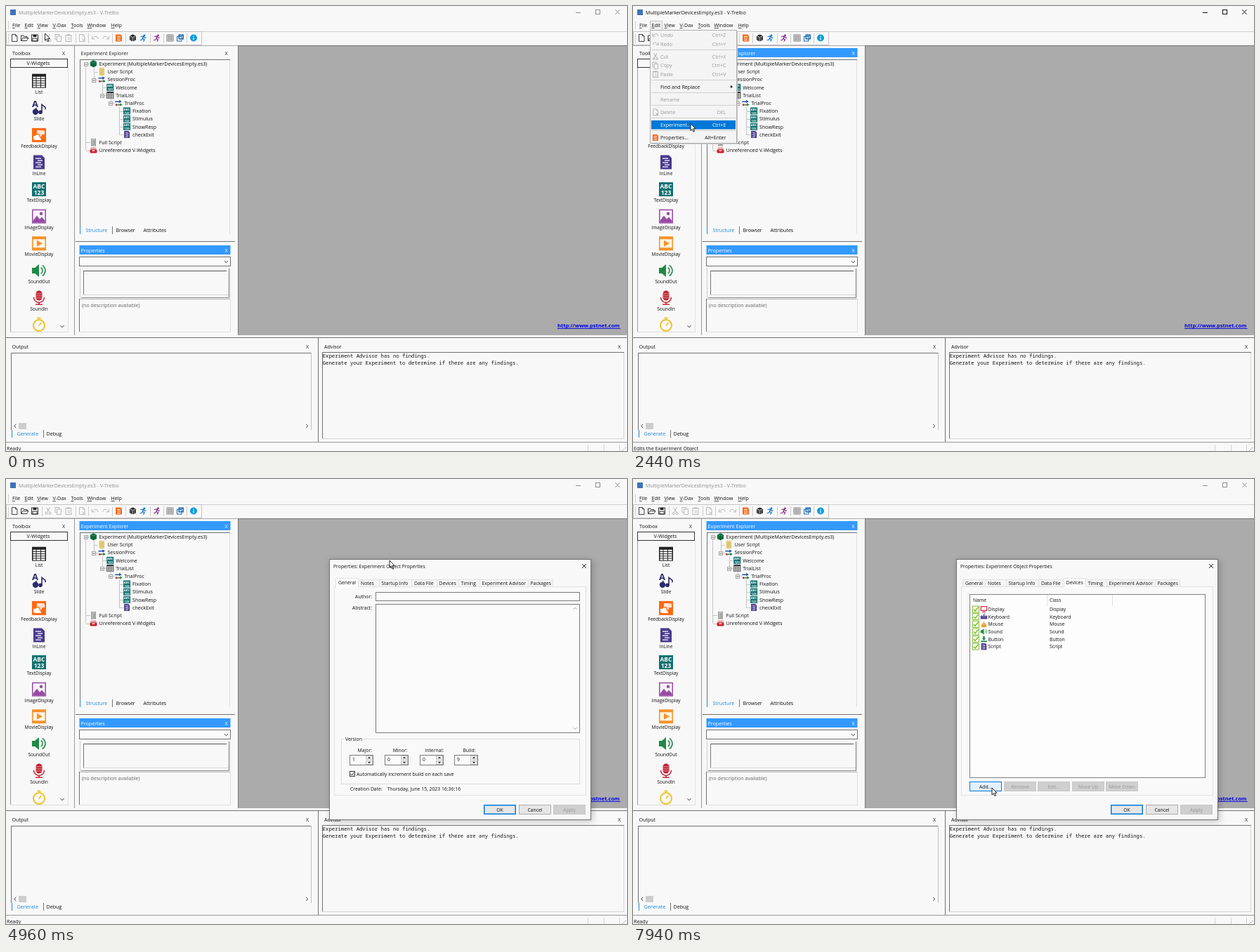
Write an HTML page with a canvas that moves like this. It is 884 px wide and 634 px high and loops after 8 s.

```html
<!DOCTYPE html>
<html lang="en">
<head>
<meta charset="utf-8">
<title>Experiment editor</title>
<style>
html, body { margin: 0; width: 100%; height: 100%; overflow: hidden; background: #f8f8f8; }
canvas { display: block; width: 884px; height: 634px; }
</style>
</head>
<body>
<canvas id="stage"></canvas>
<script>
const LOOP = 8000, W = 884, H = 634;
const BG = '#f8f8f8', BLUE = '#3399ff', LINK = '#1e88dd', DARK = '#707070', SOFT = '#d4d4d4', DIM = '#9a9a9a';
const SANS = '"Open Sans", "Noto Sans", sans-serif';
const cv = document.getElementById('stage'), g = cv.getContext('2d');
const dpr = window.devicePixelRatio || 1;
cv.width = W * dpr;
cv.height = H * dpr;

// ---- drawing helpers ----
function text(s, x, y, color = '#111', size = 7.1, align = 'left', font = SANS, weight = '') {
  g.font = `${weight} ${size}px ${font}`;
  g.textAlign = align;
  g.fillStyle = color;
  g.fillText(s, x, y);
}
function fill(x, y, w, h, c) { g.fillStyle = c; g.fillRect(x, y, w, h); }
function box(x, y, w, h, c, bg) {
  if (bg) fill(x, y, w, h, bg);
  g.strokeStyle = c;
  g.lineWidth = 1;
  g.strokeRect(x + .5, y + .5, w - 1, h - 1);
}
function hl(x, y, w, c = DARK) { fill(x, y, w, 1, c); }
function vl(x, y, h, c = DARK) { fill(x, y, 1, h, c); }
function path(pts, close) {
  g.beginPath();
  for (let i = 0; i < pts.length; i += 2) g.lineTo(pts[i], pts[i + 1]);
  if (close) g.closePath();
}
function line(pts, c = '#222', w = 1) { path(pts); g.strokeStyle = c; g.lineWidth = w; g.stroke(); }
function poly(pts, c) { path(pts, true); g.fillStyle = c; g.fill(); }
function disc(x, y, r, c) { g.beginPath(); g.arc(x, y, r, 0, 7); g.fillStyle = c; g.fill(); }
function arc(x, y, r, a, b, c, w) { g.beginPath(); g.arc(x, y, r, a, b); g.strokeStyle = c; g.lineWidth = w; g.stroke(); }
function cross(x, y, r, c, w = 1) {
  line([x - r, y - r, x + r, y + r], c, w);
  line([x - r, y + r, x + r, y - r], c, w);
}
function chevron(x, y, dx, dy, c = '#333') {
  line(dx ? [x - dx, y - 2.5, x + dx, y, x - dx, y + 2.5] : [x - 2.5, y - dy, x, y + dy, x + 2.5, y - dy], c, 1);
}
function mnemonic(s, x, y) {
  text(s, x, y);
  fill(x, y + 1, g.measureText(s[0]).width, .7, '#111');
}

// ---- icons, drawn on a 20 unit grid around the centre ----
const icons = {
  list() {
    fill(-10, -10, 20, 20, '#222');
    for (let r = 0; r < 5; r++) for (let c = 0; c < 3; c++)
      fill(c ? -10 + c * 6.5 : -8.5, -6 + r * 3.2, c ? 5.5 : 4, 2.2, '#fff');
  },
  slide() {
    text('A', -10, -1, '#2b2a6c', 13, 'left', SANS, 'bold');
    disc(-5, 5.5, 4.2, '#2b2a6c');
    line([-5, 2, -3.5, 0], '#2b2a6c', 1.5);
    line([4, 6, 4, -5, 9, -1, 9, 2], '#2b2a6c', 1.6);
    disc(2, 6, 2.8, '#2b2a6c');
  },
  feedback() {
    fill(-10, -10, 20, 20, '#ff6a13');
    for (const k of [1, -1]) {
      g.save();
      g.scale(k, k);
      poly([-8, 1, -5, 1, -2, -4, 0, -4, 0, 0, 3, 0, 3, 7, -5, 7, -8, 6], k > 0 ? '#fff' : '#ffe3d0');
      g.restore();
    }
    line([-9, -1, 0, -1, 5, 9], '#ff6a13', 1.2);
  },
  script() {
    poly([-8, -10, 4, -10, 8, -6, 8, 10, -8, 10], '#4a3a8c');
    for (let i = 0; i < 5; i++) fill(i % 2 ? -2 : -5, -6 + i * 3, i % 2 ? 7 : 8, 1.4, '#e8e4f6');
  },
  abc() {
    fill(-10, -10, 20, 20, '#0f7070');
    text('ABC', 0, -1, '#fff', 8.5, 'center', SANS, 'bold');
    text('123', 0, 8, '#fff', 8.5, 'center', SANS, 'bold');
  },
  image() {
    fill(-10, -10, 20, 20, '#964ba3');
    fill(-8.5, -8.5, 17, 17, '#f8f2fa');
    poly([-8.5, 6, -3, -1, 1, 4, 4, 1, 8.5, 6, 8.5, 8.5, -8.5, 8.5], '#964ba3');
    disc(3, -4, 2.2, '#964ba3');
  },
  movie() {
    fill(-10, -10, 20, 20, '#f5922a');
    fill(-8.5, -6, 17, 12, '#fff4e4');
    poly([-3, -4.5, 5, 0, -3, 4.5], '#f5922a');
  },
  sound() {
    poly([-10, -4, -6, -4, 0, -9, 0, 9, -6, 4, -10, 4], '#1f8a45');
    arc(0, 0, 5, -1, 1, '#1f8a45', 1.6);
    arc(0, 0, 9, -1, 1, '#1f8a45', 1.6);
  },
  mic() {
    g.beginPath();
    g.roundRect(-4.5, -10, 9, 14, 4.5);
    g.fillStyle = '#c4202f';
    g.fill();
    for (let i = 0; i < 3; i++) fill(-4.5, -6 + i * 3, 9, .8, '#eeb0b5');
    arc(0, -.5, 7.5, 0, Math.PI, '#c4202f', 1.5);
    fill(-.8, 7, 1.6, 3, '#c4202f');
    fill(-5, 9, 10, 1.4, '#c4202f');
  },
  clock() {
    arc(0, 1, 8, 0, 7, '#efc326', 2);
    fill(-2.5, -10.5, 5, 2, '#efc326');
    line([0, 1, 3.5, -3], '#efc326', 1.6);
  },
  cube() {
    poly([0, -10, 9, -6, 9, 6, 0, 10, -9, 6, -9, -6], '#0c6a3c');
    line([-9, -6, 0, -2, 9, -6], '#5fae86', 1.2);
    line([0, -2, 0, 10], '#07502b', 1.5);
  },
  page() {
    box(-7, -10, 14, 20, '#c4a646', '#f1d988');
    for (let i = 0; i < 4; i++) fill(-4, -6 + i * 4, 8, 1.4, '#bd9c3a');
  },
  grayPage() {
    box(-7, -10, 14, 20, '#666', '#d9d9d9');
    for (let i = 0; i < 4; i++) fill(-4, -6 + i * 4, 9, 1.6, '#5b6b62');
  },
  proc() {
    fill(-10, -5.5, 13, 3, '#1f4fa0');
    poly([2, -9, 9, -4, 2, 0], '#1f4fa0');
    fill(-3, 3.5, 8, 3, '#1f8a45');
    poly([4, 0, 11, 5, 4, 9], '#1f8a45');
    disc(-6, 5, 3, '#d02a35');
  },
  tray() {
    poly([-7, -8, 7, -8, 10, 0, -10, 0], '#e8a0a0');
    g.beginPath();
    g.roundRect(-10, -2, 20, 10, 3);
    g.fillStyle = '#c8202c';
    g.fill();
    fill(-4, 0, 8, 2.5, '#fff');
  },
  screen() {
    g.strokeStyle = '#d4213d';
    g.lineWidth = 2.5;
    g.strokeRect(-9, -8, 18, 12);
    fill(-5, 7, 10, 2.5, '#d4213d');
  },
  keys() { fill(-10, -3, 20, 10, '#4a3a8c'); line([0, -3, 0, -8, 4, -8], '#4a3a8c', 2); fill(-7, 0, 14, 1.2, '#cfc8ea'); },
  mouse() { disc(0, 3, 7, '#f0a030'); fill(-7, 2, 14, 7, '#f0a030'); line([0, -4, 0, -9], '#f0a030', 2); fill(-.7, -2, 1.4, 5, '#fff'); },
  press() { poly([-2.5, -9, 2.5, -9, 2.5, -2, 6, -2, 0, 4, -6, -2, -2.5, -2], '#1f8a45'); fill(-9, 5, 18, 4, '#1f8a45'); },
  check() {
    g.strokeStyle = '#7fbf33';
    g.lineWidth = 2;
    g.strokeRect(-9, -9, 18, 18);
    line([-6, 0, -2, 5, 7, -6], '#7fbf33', 3);
  },
  runner() {
    disc(4, -7, 2.8, ink);
    line([-7, -4, 1, -5, 5, 0, 9, -1], ink, 2.4);
    line([1, -4, -1, 2, 4, 5, 1, 10], ink, 2.8);
    line([-1, 2, -4, 6, -9, 6], ink, 2.4);
  },
  props() { poly([-9, -10, 5, -10, 9, -6, 9, 10, -9, 10], '#f36a1d'); for (let i = 0; i < 3; i++) fill(-5, -5 + i * 5, 10, 1.8, '#fff'); },
  sheet() { path([-7, -10, 3, -10, 8, -5, 8, 10, -7, 10], true); g.strokeStyle = ink; g.lineWidth = 1.7; g.stroke(); line([3, -10, 3, -5, 8, -5], ink, 1.5); },
  folder() { line([-10, 8, -10, -7, -4, -7, -2, -4, 7, -4, 7, 0], ink, 1.8); line([-10, 8, -5, 0, 11, 0, 6, 8, -10, 8], ink, 1.8); },
  disk() { g.strokeStyle = ink; g.lineWidth = 1.8; g.strokeRect(-9, -9, 18, 18); fill(-5, -9, 10, 6, ink); g.strokeRect(-6, 1, 12, 8); },
  cut() { line([-5, -10, 4, 4], ink, 2); line([5, -10, -4, 4], ink, 2); arc(-5, 7, 3, 0, 7, ink, 2); arc(5, 7, 3, 0, 7, ink, 2); },
  copy() { g.strokeStyle = ink; g.lineWidth = 1.8; g.strokeRect(-9, -10, 11, 14); fill(-4, -5, 12, 15, BG); g.strokeRect(-4, -5, 12, 15); },
  paste() { g.strokeStyle = ink; g.lineWidth = 1.8; g.strokeRect(-8, -8, 16, 18); fill(-4, -10, 8, 4, ink); fill(-3, -1, 8, 1.5, ink); fill(-3, 4, 8, 1.5, ink); },
  erase() { icons.sheet(); cross(5, 6, 4, ink, 2); },
  undo() { line([-9, -5, -9, 3, -1, 3], ink, 1.8); line([-9, 3, -2, -4, 5, -4, 9, 3], ink, 1.8); },
  redo() { g.scale(-1, 1); icons.undo(); },
  crate() {
    poly([0, -10, 9, -6, 9, 6, 0, 10, -9, 6, -9, -6], '#222');
    line([-9, -6, 0, -2, 9, -6], '#fff', 1.4);
    line([0, -2, 0, 10], '#fff', 1.4);
    line([-5, -4, -5, 8], '#fff', 1);
    line([5, -4, 5, 8], '#fff', 1);
  },
  grid() { fill(-10, -10, 20, 20, '#8a8a8a'); for (let i = 0; i < 9; i++) fill(-8 + i % 3 * 6, -8 + (i / 3 | 0) * 6, 4, 4, '#e4e4e4'); },
  panes() { fill(-5, -10, 15, 14, '#1769b5'); fill(-2, -6, 9, 7, BG); g.strokeStyle = '#1769b5'; g.lineWidth = 2; g.strokeRect(-9, -4, 13, 13); },
  info() { disc(0, 0, 10, '#0a9be0'); fill(-1.2, -6, 2.4, 2.6, '#fff'); fill(-1.2, -1.5, 2.4, 7.5, '#fff'); }
};
let ink = '#222';
function icon(name, x, y, size, color = '#222') {
  ink = color;
  g.save();
  g.translate(x, y);
  g.scale(size / 20, size / 20);
  icons[name]();
  g.restore();
}

// ---- main window ----
const menus = [['File', 9], ['Edit', 26.5], ['View', 44.5], ['V-Dax', 66.5], ['Tools', 92.5], ['Window', 115.5], ['Help', 149.5]];
const tools = [['sheet', 12], ['folder', 26.5], ['disk', 41], ['cut', 60, 1], ['copy', 74.5, 1], ['paste', 89, 1], ['erase', 108, 1],
  ['undo', 127, 1], ['redo', 142, 1], ['props', 160.5], ['crate', 180.5], ['runner', 195, '#0d78c8'], ['runner', 214.5, '#8a2c8c'],
  ['grid', 233.5], ['panes', 248], ['info', 267]];
const toolbox = [['List', 'list'], ['Slide', 'slide'], ['FeedbackDisplay', 'feedback'], ['InLine', 'script'], ['TextDisplay', 'abc'],
  ['ImageDisplay', 'image'], ['MovieDisplay', 'movie'], ['SoundOut', 'sound'], ['SoundIn', 'mic'], ['', 'clock']];
const tree = [['Experiment (MultipleMarkerDevicesEmpty.es3)', 0, 'cube'], ['User Script', 1, 'page'], ['SessionProc', 1, 'proc'],
  ['Welcome', 2, 'abc'], ['TrialList', 2, 'list'], ['TrialProc', 3, 'proc'], ['Fixation', 4, 'abc'], ['Stimulus', 4, 'abc'],
  ['ShowResp', 4, 'abc'], ['checkExit', 4, 'script'], ['Full Script', 0, 'grayPage'], ['Unreferenced V-Widgets', 0, 'tray']];

function header(s, y, active) {
  if (active) fill(104.5, y - 7, 215, 13, BLUE);
  const c = active ? '#fff' : '#222';
  text(s, 106.5, y + 2.7, c);
  text('X', 313.5, y + 2.5, c, 7.1, 'center');
}

function titleBar(active) {
  const c = active ? '#111' : '#8e8e8e';
  fill(6, 5, 8, 8, '#3f72b8');
  text('MultipleMarkerDevicesEmpty.es3 - V-Trelbo', 18, 12, c);
  hl(811, 9, 7, c);
  box(839, 5, 7, 7, c);
  cross(870.5, 8.5, 3.2, c);
}

function toolBar() {
  for (const [s, x] of menus) mnemonic(s, x, 30);
  hl(0, 36, W, '#cfcfcf');
  box(0, 36, 279, 20, '#c4c4c4');
  for (let y = 22; y < 53; y += 2) if (y < 34 || y > 39) fill(3, y, 1, 1, '#aaa');
  for (const x of [51, 99, 117, 151, 170, 205, 224, 257]) vl(x, 39, 14, '#cdcdcd');
  for (const [n, x, c] of tools) icon(n, x, 45.5, 10, c === 1 ? '#b4b4b4' : c);
}

function toolboxPanel() {
  text('Toolbox', 9, 70);
  text('X', 82, 69.5, '#222', 7.1, 'center');
  vl(6, 87, 377, '#999');
  vl(88, 87, 377, '#e2e2e2');
  hl(6, 464, 83, '#dcdcdc');
  box(6, 75, 82, 13, '#333', BG);
  text('V-Widgets', 46, 84, '#111', 7.1, 'center');
  toolbox.forEach(([s, n], i) => {
    const y = 106.7 + i * 38.6;
    icon(n, 47, y, 20);
    text(s, 47, y + 18, '#111', 6.6, 'center');
  });
  chevron(80, 456.5, 0, 1.3);
  vl(97, 56, 413, '#999');
}

function explorer(active) {
  header('Experiment Explorer', 67, active);
  hl(105, 76, 214, DARK);
  vl(105, 76, 249, DARK);
  vl(318, 77, 248, '#dedede');
  const row = i => 82.3 + i * 11.2, dots = '#c4c4c4';
  const trunk = (l, a, b) => vl(Math.round(113 + l * 11.9), row(a), row(b) - row(a), dots);
  trunk(0, 0, 11); trunk(1, .5, 2); trunk(2, 2.5, 4); trunk(3, 4.5, 5); trunk(4, 5.5, 9);
  tree.forEach(([s, l, n], i) => {
    const x = 113.5 + l * 11.9, y = row(i);
    hl(Math.round(x), Math.round(y), 6, dots);
    if ([0, 2, 4, 5].includes(i)) {
      const bx = Math.round(x) - 3, by = Math.round(y) - 2;
      box(bx, by, 6, 6, '#a4a4a4', '#fff');
      fill(bx + 1.5, by + 2.5, 3, 1, '#444');
    }
    icon(n, x + 11, y, 10);
    text(s, x + 19, y + 2.6);
  });
  vl(105, 314, 11, LINK);
  text('Structure', 113.5, 322, LINK);
  vl(151, 314, 11, '#777');
  text('Browser', 156.5, 322);
  text('Attributes', 195.5, 322);
  hl(99, 335, 227, DARK);
}

function properties() {
  header('Properties', 348, true);
  box(104, 357, 216, 14, DARK, '#fbfbfb');
  chevron(313.5, 364.5, 0, 1.2);
  vl(105, 373, 43, '#ccc');
  vl(319, 373, 43, '#e4e4e4');
  hl(110, 377, 204, '#555');
  vl(110, 377, 35, '#777');
  hl(107, 415, 211, '#888');
  hl(110, 411, 207, '#d8d8d8');
  vl(317, 374, 41, '#777');
  hl(105, 417, 215, '#b0b0b0');
  vl(104, 417, 47, DARK);
  vl(319, 417, 47, '#dedede');
  hl(105, 464, 215, '#dedede');
  text('(no description available)', 108, 428.5, '#666');
}

function workspace() {
  hl(0, 56, W, '#a8a8a8');
  fill(330, 56, W - 330, 413, '#ababab');
  vl(330, 56, 413, '#777');
  hl(330, 56, W - 330, '#777');
  text('http://www.pstnet.com', 785, 457.5, '#0000ee', 7.55, 'left', SANS, 'bold');
  fill(785, 459, 89.5, .9, '#0000ee');
}

function bottom(status) {
  hl(0, 472, W, DARK);
  text('Output', 8.5, 488);
  text('X', 429, 487.5, '#222', 7.1, 'center');
  hl(7, 494, 428, DARK);
  vl(7, 494, 110, DARK);
  vl(434, 494, 110, '#c0c0c0');
  chevron(13, 598.5, -1.3, 0);
  fill(18, 594, 11, 9, '#cdcdcd');
  chevron(428.5, 598.5, 1.3, 0);
  vl(8, 604, 11, LINK);
  text('Generate', 15.5, 611.7, LINK);
  vl(53, 604, 11, '#777');
  text('Debug', 57.5, 611.7);
  vl(444, 473, 148, DARK);
  text('Advisor', 453, 488);
  text('X', 873, 487.5, '#222', 7.1, 'center');
  hl(450, 493, 430, DARK);
  vl(450, 493, 123, DARK);
  hl(450, 616, 430, SOFT);
  vl(879, 494, 122, SOFT);
  const mono = '"Noto Sans Mono", "DejaVu Sans Mono", monospace';
  text('Experiment Advisor has no findings.', 450.7, 501, '#111', 7.28, 'left', mono);
  text('Generate your Experiment to determine if there are any findings.', 450.7, 510.7, '#111', 7.28, 'left', mono);
  hl(0, 621, W, '#999');
  for (const x of [828, 851, 873]) vl(x, 625, 9, SOFT);
  for (let i = 0; i < 3; i++) fill(881 - i * 2, 629 + i * 2, 1.2, 1.2, '#999');
  text(status, 1, 633);
}

// ---- Edit menu: label, centre y, shortcut, enabled, icon ----
const items = [['Undo', 41.5, 'Ctrl+Z', 0, 'undo'], ['Redo', 54, 'Ctrl+Y', 0, 'redo'], ['Cut', 72, 'Ctrl+X', 0, 'cut'],
  ['Copy', 84.7, 'Ctrl+C', 0, 'copy'], ['Paste', 97.2, 'Ctrl+V', 0, 'paste'], ['Find and Replace', 115, '', 1],
  ['Rename', 133, '', 0], ['Delete', 151.3, 'DEL', 0, 'erase'], ['Experiment...', 169.3, 'Ctrl+E', 1],
  ['Properties...', 187.5, 'Alt+Enter', 1, 'props']];
const lit = '#0078d7';

function menuItem([s, y, key, on, ic], hot) {
  if (hot) fill(26, y - 6.3, 120, 12.6, lit);
  const c = hot ? '#fff' : on ? '#111' : DIM;
  text(s, 39, y + 2.6, c);
  text(key, 132.3, y + 2.6, c, 7, 'right');
  if (ic) icon(ic, 32, y, 9, '#a8a8a8');
  if (s[0] === 'F') poly([139, y - 2.3, 142, y, 139, y + 2.3], c);
}

function editMenu(alpha, hot) {
  g.save();
  g.globalAlpha = alpha;
  fill(24, 34, 124, 162, '#f4f4f4');
  box(24, 34, 124, 162, '#b0b0b0');
  hl(26, 196, 123, '#c8c8c8');
  vl(148, 36, 160, '#c8c8c8');
  for (const y of [62, 105, 123, 141, 159, 177]) hl(26, y, 120, '#cfcfcf');
  for (const it of items) menuItem(it, it[0] === hot);
  g.restore();
}

// ---- dialog ----
const DS = 6.85;
const label = (s, x, y, align) => text(s, x, y, '#111', DS, align);
const tabs = [['General', 473, 469, 501], ['Notes', 505, 501, 531], ['Startup Info', 534.5, 531, 577], ['Data File', 581, 577, 613],
  ['Devices', 616.5, 613, 644], ['Timing', 647.5, 644, 674], ['Experiment Advisor', 677.5, 674, 743], ['Packages', 746.5, 743, 778]];

function button(s, x, y, state) {
  const off = state === 'off', hot = state === 'hot', main = state === 'main';
  box(x, y, 46, 14, main || hot ? lit : off ? '#c8c8c8' : '#adadad', off ? '#cfcfcf' : hot ? '#e2f0fb' : '#e6e6e6');
  if (main) box(x + 1, y + 1, 44, 12, '#6fb2e8');
  text(s, x + 23, y + 9.6, off ? '#979797' : '#111', DS, 'center');
}

function generalPage() {
  label('Author:', 521, 170, 'right');
  box(526, 161, 291, 13, '#7a7a7a', '#fbfbfb');
  label('Abstract:', 521, 186.3, 'right');
  box(526, 178, 291, 184, '#7a7a7a', '#fbfbfb');
  chevron(810, 184.5, 0, -1.2, '#aaa');
  chevron(810, 355.5, 0, 1.2, '#aaa');
  box(477, 370, 340, 65, '#dcdcdc');
  fill(481, 368, 27, 5, BG);
  label('Version', 483, 372.7);
  [['Major:', 1, 489, 521], ['Minor:', 0, 539, 571.5], ['Internal:', 0, 589, 623], ['Build:', 9, 638, 668.5]].forEach(([s, n, x, r]) => {
    label(s, r, 388.7, 'right');
    box(x, 393, 34, 15, '#7a7a7a', '#fbfbfb');
    label(String(n), x + 4, 402.3);
    for (const k of [0, 1]) {
      const y = 394 + k * 7;
      box(x + 23, y, 10, 6, '#c4c4c4', '#eee');
      const d = k ? 1 : -1;
      poly([x + 26, y + 3 - d, x + 30, y + 3 - d, x + 28, y + 3 + d * 1.3], '#222');
    }
  });
  box(489, 416, 8, 8, '#333', '#fff');
  line([490.5, 420, 492.3, 422, 495.5, 418], '#222', 1);
  label('Automatically increment build on each save', 499, 422.8);
  label('Creation Date:', 490, 444);
  label('Thursday, June 15, 2023 16:36:16', 542.5, 444);
}

function devicesPage(hot) {
  box(479, 164, 336, 262, '#828282', '#fdfdfd');
  label('Name', 484, 175.3);
  label('Class', 593, 175.3);
  vl(589, 165, 16, '#e0e0e0');
  vl(682, 165, 16, '#e0e0e0');
  [['Display', 'screen'], ['Keyboard', 'keys'], ['Mouse', 'mouse'], ['Sound', 'sound'], ['Button', 'press'], ['Script', 'script']].forEach(([s, n], i) => {
    const y = 185.5 + i * 10.64;
    icon('check', 488, y, 10);
    icon(n, 499.5, y, 9.5);
    label(s, 505.5, y + 2.5);
    label(s, 593, y + 2.5);
  });
  ['Add...', 'Remove', 'Edit...', 'Move Up', 'Move Down'].forEach((s, i) =>
    button(s, Math.floor(479.5 + i * 48.6), 431, i ? 'off' : hot ? 'hot' : 'main'));
}

function dialog(devices, hot) {
  g.save();
  g.shadowColor = 'rgba(0,0,0,.22)';
  g.shadowBlur = 9;
  g.shadowOffsetX = 2;
  g.shadowOffsetY = 2;
  fill(460, 114, 373, 372, BG);
  g.restore();
  box(460, 114, 373, 372, '#707070');
  label('Properties: Experiment Object Properties', 466, 127);
  cross(823, 124, 3, '#222');
  box(467, 153, 359, 298, '#e2e2e2', '#f9f9f9');
  tabs.forEach(([s, x, a, b], i) => {
    const on = i === (devices ? 4 : 0), y = on ? 141 : 143;
    box(a, y, b - a + 1, 154 - y, '#e0e0e0', on ? '#fdfdfd' : '#f5f5f5');
    if (on) fill(a + 1, 152, b - a - 1, 3, '#fdfdfd');
    label(s, x, on ? 149.7 : 150.7);
  });
  devices ? devicesPage(hot) : generalPage();
  button('OK', 680, 464, 'main');
  button('Cancel', 730, 464);
  button('Apply', 779, 464, 'off');
}

// ---- pointer: time, x, y ----
const moves = [[0, 55.5, 39], [140, 46, 32], [260, 41, 28.5], [400, 38, 28], [520, 36, 27.3], [1500, 41, 34], [1650, 52, 70],
  [1770, 62, 110], [1920, 72, 145], [2050, 79, 166.5], [2440, 82, 167.5], [4250, 100, 161], [4380, 123, 153], [4530, 262, 136],
  [4680, 390, 123], [4810, 485, 116], [4960, 546, 116], [5110, 592, 130], [5250, 618, 137], [5380, 635, 145], [5510, 624, 146.5],
  [6540, 624, 164], [6690, 618, 200], [6830, 603, 232], [6970, 593, 258], [7090, 586, 276], [7410, 562, 287], [7560, 524, 371],
  [7700, 515, 414], [7820, 511, 436], [7940, 511, 440]];

function pointer(t) {
  const [, x, y] = moves.filter(m => m[0] <= t).pop();
  g.save();
  g.translate(x, y);
  poly([0, 0, 0, 10, 2.2, 7.9, 3.8, 11.6, 5.5, 10.9, 3.9, 7.3, 7, 7.3], '#fff');
  g.strokeStyle = '#111';
  g.lineWidth = .9;
  g.stroke();
  g.restore();
}

function draw(t) {
  const open = t >= 950 && t < 3110;
  const hot = t < 1770 ? '' : t < 1920 ? 'Find and Replace' : t < 2050 ? '' : 'Experiment...';
  const status = !open || t < 1770 ? 'Ready' : t < 2050 ? '' : 'Edits the Experiment Object';
  g.setTransform(dpr, 0, 0, dpr, 0, 0);
  fill(0, 0, W, H, BG);
  titleBar(open);
  if (t >= 950 && t < 3670) box(24, 21, 18, 14, '#c6c6c6', '#f1f1f1');
  toolBar();
  workspace();
  toolboxPanel();
  explorer(t >= 950);
  properties();
  bottom(status);
  if (open) editMenu(t < 1070 ? .75 : 1, hot);
  else if (t >= 3110 && t < 3390) {
    g.globalAlpha = t < 3240 ? .65 : .3;
    menuItem(items[8], true);
    g.globalAlpha = 1;
  } else if (t >= 3390 && t < 3670) fill(26, 163, 120, 12.5, 'rgba(251,251,251,.75)');
  if (t >= 3670) dialog(t >= 5660, t >= 7820);
  pointer(t);
}

const start = performance.now();
function tick() {
  draw((performance.now() - start) % LOOP);
  requestAnimationFrame(tick);
}
tick();
</script>
</body>
</html>
```
